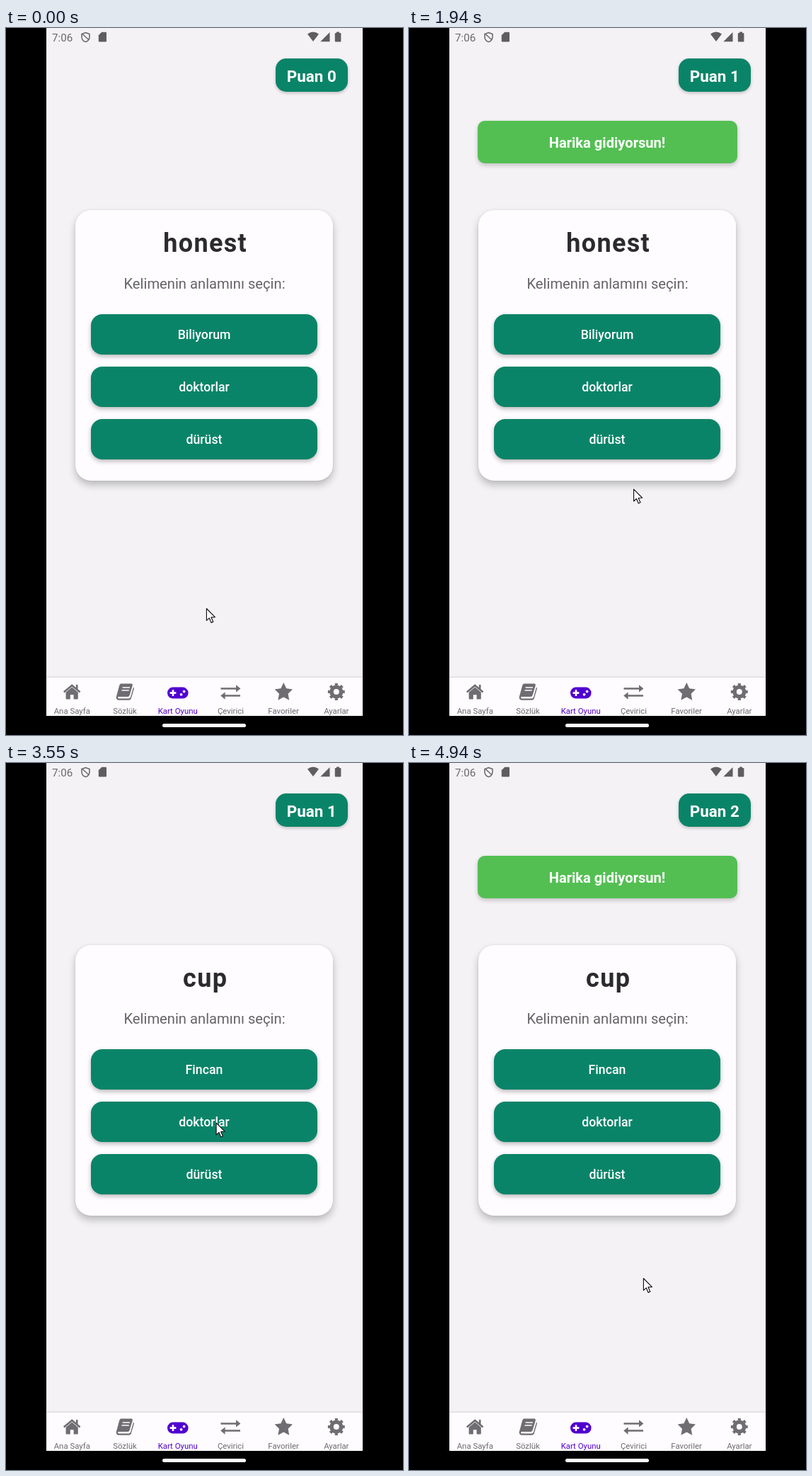
Write an HTML page that moves like this. It is 561 by 998 pixels and loops after 4970 ms.

```html
<!DOCTYPE html>
<html lang="tr">
<head>
<meta charset="utf-8">
<title>Kart Oyunu</title>
<style>
  html, body { margin: 0; width: 100%; height: 100%; overflow: hidden; background: #000; }
  #stage { position: relative; width: 561px; height: 998px; overflow: hidden; background: #000; font-family: Roboto, sans-serif; }
  #stage div, svg { position: absolute; box-sizing: border-box; }
  svg { left: 0; top: 0; }
  .screen { left: 57px; top: 0; width: 447px; height: 971px; background: #f4f2f5; }
  .bar { left: 57px; top: 917px; width: 447px; height: 54px; background: #fefcff; box-shadow: 0 -1px 2px rgba(0,0,0,.13); clip-path: inset(-4px 0 0 0); }
  .home { left: 221px; top: 982px; width: 118px; height: 4.5px; border-radius: 3px; background: #fff; }
  .text, .box { display: flex; align-items: center; justify-content: center; white-space: nowrap; }
  .box { padding-top: .1em; color: #fff; }
  .text { left: 57px; width: 447px; height: 40px; }
  .card { left: 97.5px; top: 256.5px; width: 364.5px; height: 382.5px; border-radius: 22px; background: #fefcff; box-shadow: 0 6px 11px rgba(0,0,0,.24), 0 0 3px rgba(0,0,0,.08); }
  .score { left: 381px; top: 43px; width: 101.5px; height: 47px; border-radius: 15px; background: #0a8468; font: bold 22.4px Roboto, sans-serif; box-shadow: 0 2px 4px rgba(0,0,0,.22); }
  .toast { left: 96.5px; top: 131px; width: 367px; height: 59.5px; border-radius: 10px; background: #53bf52; font: bold 20.1px Roboto, sans-serif; box-shadow: 0 3px 6px rgba(0,0,0,.2); }
  .answer { left: 120px; width: 320px; height: 56.5px; border-radius: 16px; background: #0a8468; font: 500 17.7px Roboto, sans-serif; box-shadow: 0 3px 6px rgba(0,0,0,.27); }
  .word { top: 283.7px; left: 57.5px; padding-left: 1.3px; font-size: 36px; font-weight: bold; letter-spacing: 1.3px; color: #2b2a2d; }
  .hint { top: 341px; font-size: 20.2px; color: #656367; }
  .clock { left: 65px; top: 0; width: auto; height: 27px; font-size: 15.2px; color: #6a686b; }
  .tab { top: 944px; width: 80px; font-size: 11.4px; color: #6c6a6e; }
</style>
</head>
<body>
<div id="stage">
  <div class="screen"></div>
  <div class="text clock">7:06</div>
  <div class="box score" id="score"></div>
  <div class="box toast" id="toast">Harika gidiyorsun!</div>
  <div class="card"></div>
  <div class="text word" id="word"></div>
  <div class="text hint">Kelimenin anlamını seçin:</div>
  <div class="box answer" id="first" style="top:404.3px"></div>
  <div class="box answer" style="top:478px">doktorlar</div>
  <div class="box answer" id="third" style="top:552px">dürüst</div>
  <div class="bar"></div>
  <div class="home"></div>
  <svg width="561" height="998" viewBox="0 0 561 998">
    <g fill="#5f5d60">
      <path d="M112.5 6.5L118 8.6V12.4C118 16 115.7 18.5 112.5 19.6C109.3 18.5 107 16 107 12.4V8.6Z" fill="none" stroke="#656367" stroke-width="1.5"/>
      <path d="M108 8.5L117 16.8" fill="none" stroke="#656367" stroke-width="1.4"/>
      <path d="M135.2 5.8H140.8Q142 5.8 142 7V18.2Q142 19.4 140.8 19.4H132Q130.8 19.4 130.8 18.2V10.2Z"/>
      <path d="M426 8.6Q434 2.6 442 8.6L434 19Z"/>
      <path d="M457.5 6V19.2H444.3Z"/>
      <path d="M467 5.6H471V7H472.4Q473.4 7 473.4 8V18.4Q473.4 19.4 472.4 19.4H465.8Q464.8 19.4 464.8 18.4V8Q464.8 7 465.8 7H467Z"/>
    </g>
    <g fill="#6f6d71">
      <path d="M93.2 930.6L101.8 937.8V946.4Q101.8 947.6 100.6 947.6H95.6V941.2H90.8V947.6H85.8Q84.6 947.6 84.6 946.4V937.8Z"/>
      <path d="M81.8 937.6L93.2 928L104.6 937.6M100.2 927V933" fill="none" stroke="#6f6d71" stroke-width="2.6"/>
      <path d="M162.6 925.5H177.4Q179.4 925.7 178.8 928L174.6 942Q174 944 172 944H159Q157.6 944.3 158 945.5Q158.4 946.4 160 946.4H173.6Q175.4 946.4 176 944.6L180 930.4Q181.4 931.2 180.8 933L176.8 946.4Q176 948.8 173.6 948.8H159.6Q155.4 948.6 155.8 944.2L160.2 928Q160.8 925.7 162.6 925.5Z"/>
      <path d="M164.6 931H175M163.5 935H173.8" stroke="#fefcff" stroke-width="1.5"/>
      <path d="M303.5 932.4H326M331 942.6H309" stroke="#6f6d71" stroke-width="2.5"/>
      <path d="M325 927.2L331.4 932.4L325 937.6ZM309.6 937.4L303.2 942.6L309.6 947.8Z"/>
      <path d="M392.3 924L396.2 932.2L405 933.5L398.6 939.8L400.2 948.7L392.3 944.5L384.4 948.7L386 939.8L379.6 933.5L388.4 932.2Z"/>
      <g fill="none" stroke="#6f6d71" transform="translate(466.8 937)">
        <circle r="6.8" stroke-width="5.6"/>
        <circle r="10.3" stroke-width="3.4" pathLength="16" stroke-dasharray="1 1" transform="rotate(-11.25)"/>
      </g>
    </g>
    <rect x="228" y="930.6" width="29.6" height="16" rx="8" fill="#5000d0"/>
    <path d="M236 934.2V943M231.6 938.6H240.4" stroke="#fefcff" stroke-width="2.6"/>
    <g fill="#fefcff"><circle cx="247.6" cy="940.8" r="1.9"/><circle cx="251.6" cy="936.6" r="1.9"/></g>
    <path id="cursor" d="M.4 .5V17.4L4.3 13.9L7.1 20.4L9.8 19.2L7 12.9L12.4 12.6Z" fill="#fff" stroke="#111" stroke-width="1.15" stroke-linejoin="round"/>
  </svg>
</div>
<script>
  const LOOP = 4970;
  const $ = id => document.getElementById(id);
  const stage = $('stage');

  ['Ana Sayfa', 'Sözlük', 'Kart Oyunu', 'Çevirici', 'Favoriler', 'Ayarlar'].forEach((name, i) => {
    const tab = document.createElement('div');
    tab.className = 'text tab';
    tab.textContent = name;
    tab.style.left = 53.3 + i * 74.7 + 'px';
    if (i === 2) tab.style.color = '#5000d0';
    stage.append(tab);
  });

  // time, x, y of the pointer tip
  const path = [
    [0, 283, 819], [350, 283, 819], [880, 320, 552], [940, 320, 552],
    [1120, 318, 582], [1600, 318, 582], [2350, 316, 748], [3100, 316, 748],
    [3780, 291, 437], [4180, 291, 437], [4780, 331, 727], [LOOP, 331, 727]
  ];
  const clamp = v => Math.min(1, Math.max(0, v));
  const ease = v => v < .5 ? 2 * v * v : 1 - 2 * (1 - v) ** 2;

  function pointer(t) {
    const i = path.findIndex(p => p[0] > t);
    const [t0, x0, y0] = path[i - 1], [t1, x1, y1] = path[i];
    const k = ease((t - t0) / (t1 - t0));
    return [x0 + (x1 - x0) * k, y0 + (y1 - y0) * k];
  }

  // Dims to 20 % while held, then recovers after release
  function press(t, down, up) {
    const k = t < up ? ease(clamp((t - down) / 150)) : 1 - ease(clamp((t - up) / 250));
    return 1 - .8 * k;
  }

  function setText(id, text) {
    const el = $(id);
    if (el.textContent !== text) el.textContent = text;
  }

  function draw(t) {
    const hit1 = 1310, next = 2810, hit2 = 4090;
    setText('score', 'Puan ' + (t < hit1 ? 0 : t < hit2 ? 1 : 2));
    setText('word', t < next ? 'honest' : 'cup');
    setText('first', t < next ? 'Biliyorum' : 'Fincan');
    $('toast').style.visibility = (t >= hit1 && t < next) || t >= hit2 ? 'visible' : 'hidden';
    $('third').style.opacity = press(t, 1125, 1278);
    $('first').style.opacity = press(t, 3900, 4060);
    $('cursor').setAttribute('transform', `translate(${pointer(t)})`);
  }

  const start = performance.now();
  function frame() {
    draw((performance.now() - start) % LOOP);
    requestAnimationFrame(frame);
  }
  frame();
</script>
</body>
</html>
```
